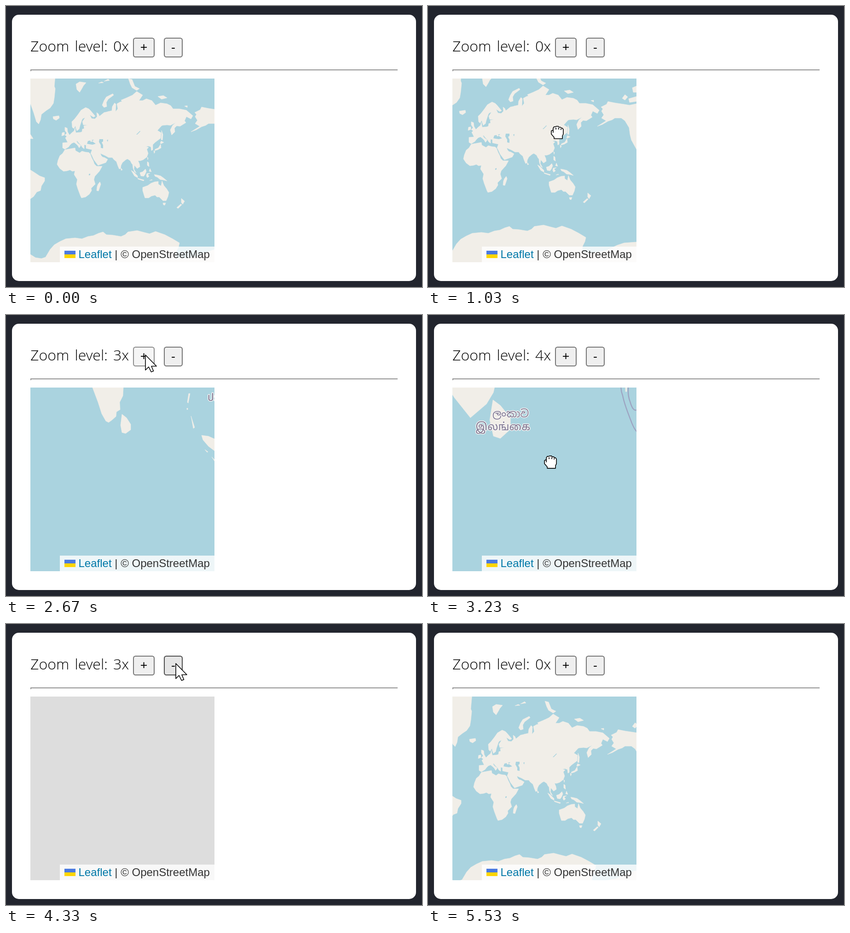
Recreate the animation shown at these times as an HTML page. Size 904 by 612 pixels, loop 7210 ms.

```html
<!DOCTYPE html>
<html lang="en">
<head>
<meta charset="utf-8">
<title>Map zoom</title>
<style>
html, body { margin: 0; width: 100%; height: 100%; overflow: hidden; background: #22252e; }
svg { display: block; }
.land { fill: #f1eee8; stroke: #f1eee8; stroke-width: .6; stroke-linejoin: round; }
.water { fill: #aad3df; }
.border { fill: none; stroke: #9c9cbc; stroke-width: 2.4; stroke-linejoin: round; opacity: .85; }
.thin { stroke-width: 1.2; opacity: .6; }
.label { font: 23px "Noto Sans", "Noto Sans Myanmar", "Noto Sans Thai", "Noto Sans Sinhala", "Noto Sans Tamil", sans-serif;
  fill: #7c7390; stroke: #f6f4f2; stroke-width: 3; paint-order: stroke; stroke-linejoin: round; }
.city { fill: #3c3c3c; }
.ui { font-family: "Liberation Sans", Arial, sans-serif; }
.title { font: 300 32px "Open Sans", "Noto Sans", sans-serif; word-spacing: 4px; }
.button rect { fill: #efefef; stroke: #767676; stroke-width: 2; }
.button.hover rect { fill: #e5e5e5; stroke: #4f4f4f; }
.button.down rect { fill: #f5f5f5; stroke: #8d8d8d; }
.button text { font-size: 26.7px; text-anchor: middle; }
.pointer path { fill: #fff; stroke: #000; stroke-width: 1.6; stroke-linejoin: round; }
</style>
</head>
<body>
<svg width="904" height="612" viewBox="0 0 904 612">
  <defs><clipPath id="frame"><rect x="53" y="158" width="400" height="400"/></clipPath></defs>
  <rect width="904" height="612" fill="#22252e"/>
  <rect x="13" y="19" width="878" height="580" rx="15" fill="#fff"/>
  <text class="title" x="53" y="99" id="level">Zoom level: 0x</text>
  <g class="button ui" id="plus"><rect x="277" y="70" width="45" height="41" rx="4.5"/><text x="299.5" y="98">+</text></g>
  <g class="button ui" id="minus"><rect x="344" y="70" width="39" height="41" rx="4.5"/><text x="363.5" y="99">-</text></g>
  <path d="M53 138h798v2H55v2h-2z" fill="#9a9a9a"/>
  <path d="M55 140h796v1.5H55z" fill="#eee"/>

  <g clip-path="url(#frame)">
    <rect x="53" y="158" width="400" height="400" fill="#ddd"/>
    <g id="tiles">
      <rect class="water" x="53" y="158" width="400" height="400"/>
      <g id="world">
        <!-- Europe -->
        <path class="land" d="M123 309 123 298 134 297 129 287 134 284 138 281 143 276 148 272 150 265 151 272 152 276 162 275 165 274 166 268 170 267 169 261 178 259 168 259 166 252 172 243 167 245 165 248 161 260 159 268 154 272 152 266 151 261 147 267 144 264 143 252 149 246 156 237 163 227 173 221 180 224 184 228 194 240 190 242 182 237 186 245 193 246 198 241 197 232 201 235 203 240 213 232 222 230 222 325 187 313 178 311 174 310 174 303 170 302 170 311 166 308 163 303 158 298 155 294 153 294 156 299 162 303 162 305 159 309 156 304 153 301 148 297 143 299 139 303 136 307 128 312Z"/>
        <!-- Northern Asia -->
        <path class="land" d="M221 230 230 228 231 219 236 211 239 214 238 230 243 224 241 213 248 209 252 208 250 205 262 200 275 194 284 186 297 194 289 206 297 206 305 202 317 206 325 216 336 211 350 213 358 217 363 224 377 224 392 227 406 239 402 246 392 241 388 250 391 254 378 262 371 261 366 266 367 274 360 281 357 270 362 260 369 254 357 260 350 259 340 260 338 261 329 271 337 276 336 288 324 297 319 302 319 313 316 315 315 307 310 305 221 320Z"/>
        <!-- Southern Asia -->
        <path class="land" d="M221 300 311 300 310 305 306 303 304 306 310 308 306 312 309 321 306 329 298 335 292 337 287 337 290 344 291 350 285 354 279 347 278 355 283 364 279 361 276 353 275 345 273 343 270 337 264 333 260 335 253 341 250 347 249 354 246 355 243 348 240 339 234 334 231 330 223 330 216 326 205 321 207 326 210 329 214 330 221 334 217 341 200 347 197 343 191 335 186 324 184 321 187 313Z"/>
        <!-- Africa -->
        <path class="land" d="M128 313 150 309 151 315 160 320 165 316 172 318 180 319 183 322 186 330 190 338 192 344 197 349 209 349 203 360 193 371 191 378 194 388 185 397 186 402 181 410 173 416 164 418 162 414 156 398 153 388 155 378 148 367 150 359 144 360 139 357 133 359 125 360 117 354 111 345 113 336 117 326 123 321Z"/>
        <!-- Americas and Greenland -->
        <path class="land" d="M40 140H108L105 175 107 180 105 200 103 212 96 222 87 228 77 236 75 248 71 257 66 252 60 232 55 218 45 190ZM30 345 53 357 61 362 73 370 84 374 84 381 77 392 75 402 67 405 60 415 53 420 30 430ZM50 275 56 284 59 289 50 289Z"/>
        <path class="land" d="M411 241 414 236 410 232 422 226 425 220 440 223 460 226 472 228 500 222V340L487 324 476 304 473 292 471 277 462 262 454 256 440 256 434 260 425 263 413 270 402 274 421 262 411 256 416 249ZM456 213 462 205 468 210 462 217ZM470 214 487 209 500 218 472 222ZM478 190 490 185 500 200 480 200Z"/>
        <!-- Northern islands -->
        <path class="land" d="M102 241 108 240 115 239 116 244 109 249 103 246ZM152 170 160 165 174 167 168 174 166 178 160 188 154 182ZM201 168 208 165 212 167ZM213 164 222 159 225 162ZM209 216 213 206 218 198 232 191 234 194 222 203 218 210 219 219 213 221ZM266 158 274 160 280 175 290 180 284 184 274 178 270 170ZM330 197 342 195 350 200 338 203ZM388 218 394 217 394 221ZM129 288 138 285 138 281 134 274 133 266 128 264 128 271 132 277 128 281 132 284ZM121 283 127 281 127 275 122 276Z"/>
        <!-- Asian and African islands -->
        <path class="land" d="M204 383 206 388 201 403 197 402 198 393 200 388ZM250 353 253 357 250 358ZM337 294 343 297 337 300 335 299ZM336 301 337 309 330 313 323 315 324 312 331 309ZM321 315 324 317 322 321ZM338 271 341 280 340 292 337 291 338 280ZM307 329 309 331 308 335ZM307 339 310 341 311 350 307 347ZM313 354 316 361 311 360ZM291 363 297 361 303 355 305 360 302 367 299 371 293 370ZM272 358 277 361 286 370 286 374 279 370ZM286 375 300 379 299 381 287 377ZM306 365 313 364 308 367 311 371 307 374 305 370Z"/>
        <!-- Oceania -->
        <path class="land" d="M322 367 328 368 336 370 343 375 350 381 342 379 335 378 329 373 324 371ZM312 380 317 378 318 379ZM297 402 297 395 308 391 315 386 323 383 331 382 331 388 337 392 339 381 343 391 349 398 354 406 352 415 348 424 341 424 337 420 333 416 328 416 324 412 316 414 310 418 302 418 300 412ZM341 429 347 429 345 434 342 433ZM381 419 388 425 384 432 381 428ZM380 431 382 433 374 441 371 439Z"/>
        <!-- Antarctica -->
        <path class="land" d="M28 529 53 541 64 548 77 550 86 547 96 530 105 520 117 513 130 507 150 505 165 507 178 502 190 500 201 495 211 492 218 498 232 499 250 502 259 498 265 492 285 489 300 493 312 496 325 491 345 498 362 507 377 516 375 525 370 535 368 548 390 550 420 545 445 533 460 528 487 526 520 530 565 541V640H28Z"/>
        <!-- Inland seas -->
        <path class="water" d="M176 300 178 294 183 293 184 296 188 295 195 300 188 302 181 301ZM186 292 191 291 188 294ZM203 290 211 290 211 295 208 297 211 303 211 310 206 309 206 303 202 296ZM219 292 222 291 221 296ZM283 280 291 272 292 273 285 280ZM180 366 183 365 183 368 180 369Z"/>
      </g>
      <g id="coast">
        <path class="land" d="M186 140 188 158 200 190 208 215 217 231 223 234 230 229 239 221 240 211 248 206 247 190 254 176 256 140ZM252 216 262 224 271 238 271 250 260 258 252 256 249 240ZM397 171 400 171 396 192 394 190ZM393 203h2v3h-2zM402 220 410 245 407 247ZM425 262 440 264 460 273V301L440 286 428 272ZM432 293l7 5-2 1zM447 309l10 10-2 2z"/>
        <text class="label" x="438" y="187">ประเทศไทย</text>
      </g>
      <g id="region">
        <path class="land" d="M-45 425-10 395 5 370 18 311 8 270 20 235 53 210 72 195 95 178 118 158 125 130H-130V300L-80 381ZM4 386 20 398 42 425 42 450 20 470 5 465-3 430Z"/>
        <path class="land" d="M306 130 312 158 325 168 331 185 336 205 333 235 345 242 365 240 376 235 385 215 398 212 405 225 409 245 416 265 420 290 432 300 436 325 438 350 432 370 425 395 422 410 426 430 436 440 445 434 480 455V130ZM357 482 365 476 385 484 410 488 430 500 470 525V620L420 570 380 540 362 508Z"/>
        <path class="land" d="M301 292 306 294 304 318 299 343 296 340 300 318ZM292 359h3v9h-3zM317 412l3 8-3 1zM320 442l5 3-1 9-4-3z"/>
        <path class="water" d="M376 236 388 212 400 208 411 240 405 256 388 248ZM424 322 434 330 430 346 421 338ZM426 380 440 365 446 372 434 392Z"/>
        <path class="border" d="M20 258 53 235 70 222 90 205 110 190 135 167 160 148M298 140 312 175 328 195 330 248 410 278 408 320 402 340 410 375 413 390M422 418 424 437 438 444 442 460 460 464M436 480 442 468 458 472M372 545 358 520 351 495 346 475 353 465 375 478 400 477 420 486 470 505"/>
        <path class="border" d="M305 288C296 296 293 312 290 330C281 345 280 362 286 377C290 398 299 418 306 437C313 454 320 462 329 457C334 449 329 441 323 435C328 424 326 408 318 407C311 412 306 404 302 390C295 372 298 352 302 343C314 337 315 321 312 307C313 294 311 289 305 288ZM410 391C420 388 421 397 416 405C418 417 413 421 408 417C404 409 407 399 410 391Z"/>
        <g class="border">
          <circle cx="319" cy="266" r="6"/><circle cx="312" cy="284" r="6.5"/><circle cx="334" cy="299" r="5"/><circle cx="325" cy="326" r="5"/>
          <circle cx="377" cy="220" r="3.4" stroke="#777" fill="#fff" stroke-width="1.5"/>
        </g>
        <path class="border thin" d="M53 194 66 182 78 184 88 170 103 164M346 158 344 185 352 205 348 232M398 158 404 177 400 190 416 194 425 215 440 232 437 260 448 288 446 325 452 350M412 158 420 176 435 184 434 204 453 212M453 250 444 268M438 352 450 360 440 385 444 405 438 425M395 510 410 525 430 530M375 490 385 500 380 520"/>
        <text class="label" x="361" y="181" text-anchor="middle">မြန်မာ</text>
        <text class="label city" x="377" y="248" text-anchor="middle">ရန်ကုန်</text>
        <text class="label" x="430" y="319">ประเทศไทย</text>
        <text class="label" x="82" y="424" text-anchor="end">ලංකාව</text>
        <text class="label" x="85" y="452" text-anchor="end">இலங்கை</text>
        <text class="label city" x="399" y="518">Medan</text>
      </g>
    </g>
    <rect x="117" y="524" width="336" height="34" fill="#fff" opacity=".8"/>
    <path d="M127 533h24v8h-24z" fill="#4c7be1"/>
    <path d="M127 541h24v8h-24z" fill="#ffd500"/>
    <text class="ui" x="157.5" y="549" font-size="24" fill="#333"><tspan fill="#0078a8">Leaflet</tspan> | © OpenStreetMap</text>
  </g>

  <g class="pointer" id="pointer">
    <path id="arrow" stroke-width="1.2" d="M0 0V33L7 26 12.500 37 17.500 35 13 24.500H24Z"/>
    <path id="fist" d="M-7 14V11L-13 4V-3L-9-5V-9L-7-12H-4L-2-13H2L4-11H7L9-9H11L13-6V4L11 8V14ZM-9-5V1M-3-10V-6M3-10V-6M8-8V-5"/>
    <path id="palm" d="M-7 14V10L-14 1V-2H-11L-8 1V-11L-6-13-3-11V-15L0-17 3-15V-11L6-13 8-11V-6L11-8 13-6V4L11 8V14ZM-3-11V-3M3-11V-3M8-6V-2"/>
  </g>
</svg>
<script>
const LOOP = 7210, MIDDLE = [253, 358];
const $ = id => document.getElementById(id);

// [time, x, y]
const pointerPath = [
  [30, 300, 640], [380, 318, 300], [480, 315, 287], [740, 270, 300], [1030, 281, 275],
  [1400, 318, 275], [1500, 318, 275], [1850, 303, 87], [2790, 303, 87], [3000, 369, 169],
  [3010, 369, 169], [3300, 249, 345], [3330, 249, 345], [3430, 369, 169], [3440, 369, 169],
  [3700, 249, 345], [3770, 249, 345], [4150, 369, 86], [4990, 369, 86], [5200, 355, 200], [5510, 342, 630]
];
// Map point shown in the middle, in level 0 pixels
const centerPath = [
  [480, 253, 358], [740, 298, 345], [1030, 287, 370], [1400, 250, 370], [3010, 250, 370],
  [3300, 257.5, 359], [3440, 257.5, 359], [3700, 265, 348]
];
const drags = [[480, 1430], [3010, 3310], [3440, 3770]];
// [time, level, delay before tiles appear]
const zooms = [
  [-999, 0, 0], [2100, 1, 50], [2320, 2, 50], [2540, 3, 50], [2740, 4, 50],
  [4290, 3, 999], [4500, 2, 50], [4710, 1, 50], [4920, 0, 50]
];
const pressTime = 110, fadeTime = 70;

const clamp = v => Math.max(0, Math.min(1, v));

function along(path, t) {
  const next = path.findIndex(k => k[0] > t);
  if (next === 0) return path[0].slice(1);
  if (next < 0) return path[path.length - 1].slice(1);
  const [t0, x0, y0] = path[next - 1], [t1, x1, y1] = path[next];
  const u = (t - t0) / (t1 - t0), e = u * u * (3 - 2 * u);
  return [x0 + (x1 - x0) * e, y0 + (y1 - y0) * e];
}

function show(id, visible) { $(id).style.display = visible ? '' : 'none'; }

function drawMap(level, [cx, cy]) {
  const scale = 2 ** level;
  show('world', level < 3);
  show('coast', level === 3);
  show('region', level === 4);
  $('world').setAttribute('transform',
    `translate(${MIDDLE[0] - cx * scale} ${MIDDLE[1] - cy * scale}) scale(${scale})`);
  $('coast').setAttribute('transform', `translate(${(250 - cx) * 8} ${(370 - cy) * 8})`);
  $('region').setAttribute('transform', `translate(${(265 - cx) * 16} ${(348 - cy) * 16})`);
}

function drawButton(id, left, right, [x, y], pressed) {
  const over = x >= left && x <= right && y >= 69 && y <= 112;
  $(id).classList.toggle('hover', over);
  $(id).classList.toggle('down', over && pressed);
}

function drawPointer(t, [x, y]) {
  const onMap = x >= 53 && x <= 453 && y >= 158 && y <= 558;
  const dragging = drags.some(([from, to]) => t >= from && t < to);
  show('pointer', t > 30 && t < 5510);
  show('arrow', !onMap);
  show('fist', onMap && dragging);
  show('palm', onMap && !dragging);
  $('pointer').setAttribute('transform', `translate(${x} ${y})`);
}

function draw() {
  const t = performance.now() % LOOP;
  const [since, level, delay] = zooms.filter(z => z[0] <= t).pop();
  const pressed = zooms.some(z => z[0] > t && z[0] - t <= pressTime);
  const pointer = along(pointerPath, t);
  $('level').textContent = `Zoom level: ${level}x`;
  $('tiles').style.opacity = clamp((t - since - delay) / fadeTime);
  drawMap(level, along(centerPath, t));
  drawButton('plus', 276, 323, pointer, pressed);
  drawButton('minus', 343, 384, pointer, pressed);
  drawPointer(t, pointer);
  requestAnimationFrame(draw);
}
draw();
</script>
</body>
</html>
```
